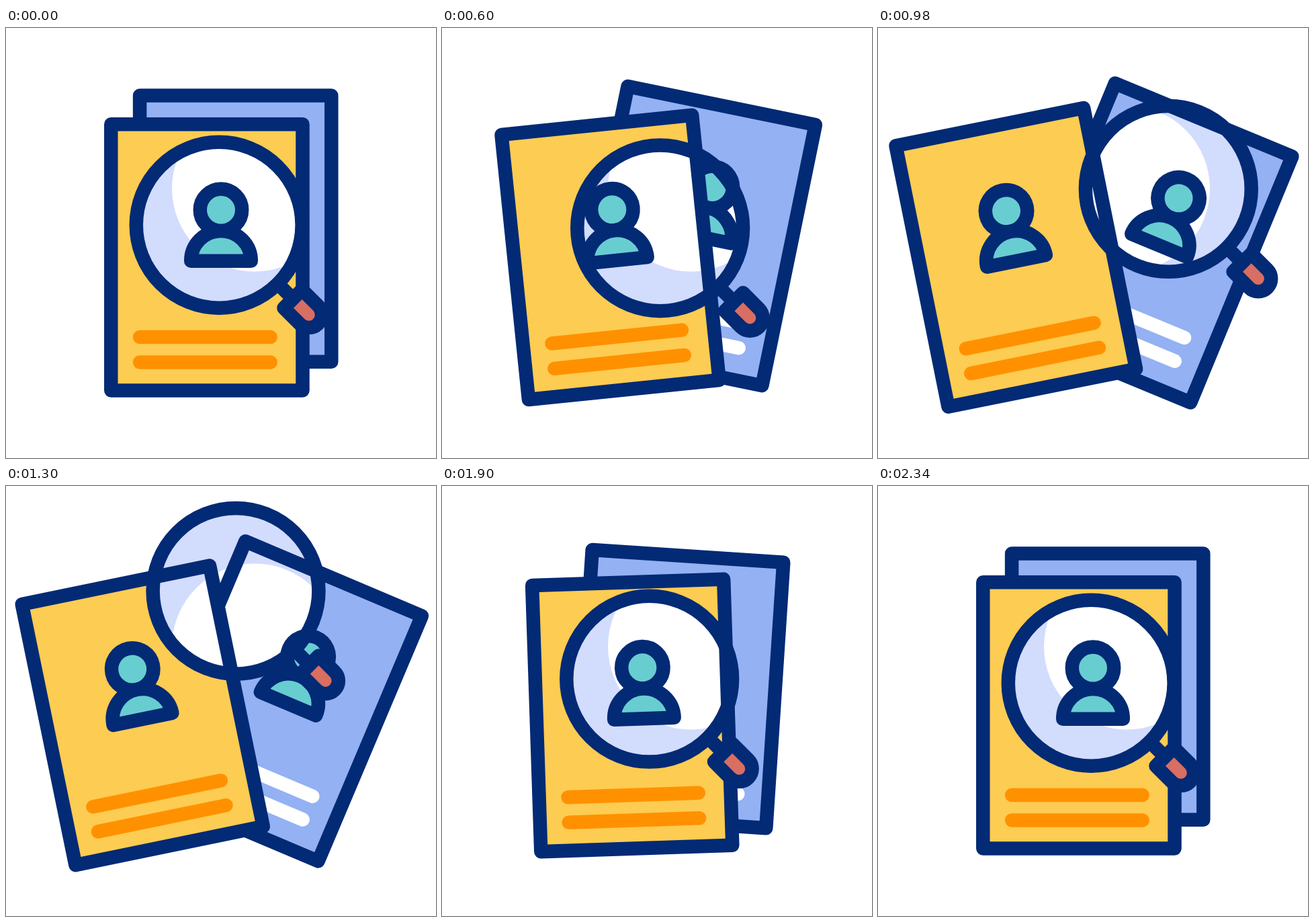
Animation of 640x640 px, one loop 2400 ms. Source, as an HTML page with a canvas:

```html
<!DOCTYPE html>
<html lang="en">
<head>
<meta charset="utf-8">
<title>Profile search</title>
<style>
  html, body { margin: 0; width: 100%; height: 100%; overflow: hidden; background: #fff; }
  canvas { display: block; width: 640px; height: 640px; }
</style>
</head>
<body>
<canvas id="stage" width="640" height="640"></canvas>
<script>
const ctx = document.getElementById('stage').getContext('2d');
const LOOP = 2400;
const NAVY = '#032a75', YELLOW = '#fdcc52', ORANGE = '#ff9100', BLUE = '#93b1f3';
const LILAC = '#d2dcfd', TEAL = '#68cdd1', RED = '#d96e62', WHITE = '#fff';
const STROKE = 20.5, CARD_W = 285.2, CARD_H = 396.3, LENS_R = 123.4;
const RAD = Math.PI / 180;

// Time (ms), angle on the lens orbit (deg), angular speed (deg/ms)
const ORBIT = [
  [350, 82.6, 0], [600, 77.5, -0.07], [980, -44.4, -0.29], [1300, -122.4, -0.265],
  [1600, -213.6, -0.28], [1900, -271.2, -0.07], [2150, -277.4, 0]
];

// Symmetric cubic-bezier(.76, 0, .24, 1)
function ease(x) {
  if (x <= 0) return 0;
  if (x >= 1) return 1;
  let lo = 0, hi = 1, s = 0.5;
  for (let i = 0; i < 24; i++) {
    s = (lo + hi) / 2;
    const bx = 3 * (1 - s) * (1 - s) * s * 0.76 + 3 * (1 - s) * s * s * 0.24 + s * s * s;
    if (bx < x) lo = s; else hi = s;
  }
  return s * s * (3 - 2 * s);
}

function spread(t) {
  return ease(t / 1200) - ease((t - 1220) / 1090);
}

function orbitAngle(t) {
  if (t <= ORBIT[0][0]) return ORBIT[0][1];
  for (let i = 1; i < ORBIT.length; i++) {
    const [t0, a0, v0] = ORBIT[i - 1], [t1, a1, v1] = ORBIT[i];
    if (t > t1) continue;
    const d = t1 - t0, u = (t - t0) / d, u2 = u * u, u3 = u2 * u;
    return a0 * (2 * u3 - 3 * u2 + 1) + a1 * (3 * u2 - 2 * u3)
      + d * (v0 * (u3 - 2 * u2 + u) + v1 * (u3 - u2));
  }
  return ORBIT[0][1] - 360;
}

// Tilted ellipse
function lensCentre(t) {
  const a = orbitAngle(t) * RAD, tilt = 38.3 * RAD;
  const u = 97.8 * Math.cos(a), v = 67 * Math.sin(a);
  return {
    x: 348.5 + u * Math.cos(tilt) - v * Math.sin(tilt),
    y: 233.3 + u * Math.sin(tilt) + v * Math.cos(tilt)
  };
}

function at(x, y, deg, draw) {
  ctx.save();
  ctx.translate(x, y);
  ctx.rotate(deg * RAD);
  draw();
  ctx.restore();
}

function paint(fill, stroke) {
  if (fill) { ctx.fillStyle = fill; ctx.fill(); }
  if (stroke) { ctx.strokeStyle = stroke; ctx.stroke(); }
}

function circle(x, y, r, fill, stroke) {
  ctx.beginPath();
  ctx.arc(x, y, r, 0, 2 * Math.PI);
  paint(fill, stroke);
}

function line(x0, x1, y, color) {
  ctx.beginPath();
  ctx.moveTo(x0, y);
  ctx.lineTo(x1, y);
  paint(null, color);
}

function cardRect(fill, stroke) {
  ctx.beginPath();
  ctx.rect(-CARD_W / 2, -CARD_H / 2, CARD_W, CARD_H);
  paint(fill, stroke);
}

function person(x, y) {
  circle(x, y - 76, 31.2, TEAL, NAVY);
  ctx.beginPath();
  ctx.arc(x, y, 44.8, Math.PI, 2 * Math.PI);
  ctx.closePath();
  paint(TEAL, NAVY);
}

function cardDetails(personX, personY, lineY, lineColor, lineEnd) {
  cardRect(null, NAVY);
  line(-99.8, lineEnd, lineY, lineColor);
  line(-99.8, lineEnd, lineY + 37.6, lineColor);
  person(personX, personY);
}

function glass(lens) {
  ctx.save();
  circle(lens.x, lens.y, LENS_R, LILAC);
  ctx.clip();
  circle(370.5, 239, 123.5, WHITE);
  ctx.restore();
}

function magnifier(lens) {
  circle(lens.x, lens.y, LENS_R, null, NAVY);
  at(lens.x, lens.y, 45, () => {
    line(LENS_R, 150, 0, NAVY);
    ctx.beginPath();
    ctx.moveTo(155.3, -19.2);
    ctx.lineTo(189, -19.2);
    ctx.arc(189, 0, 19.2, -Math.PI / 2, Math.PI / 2);
    ctx.lineTo(155.3, 19.2);
    ctx.closePath();
    paint(RED, NAVY);
  });
}

function draw(t) {
  const p = spread(t), lens = lensCentre(t);
  const back = [341.7 + 69 * p, 298.6 + 21.8 * p, 23 * p];
  const front = [298.9 - 96 * p, 341.4, -11.65 * p];

  ctx.fillStyle = WHITE;
  ctx.fillRect(0, 0, 640, 640);
  ctx.lineWidth = STROKE;
  ctx.lineCap = ctx.lineJoin = 'round';

  at(...back, () => cardRect(BLUE));
  at(...front, () => cardRect(YELLOW));
  glass(lens);

  // The back card's outlines stay hidden behind the front card
  ctx.save();
  at(...front, () => {
    cardRect();
    ctx.rect(-1500, -1500, 3000, 3000);
  });
  ctx.clip('evenodd');
  at(...back, () => cardDetails(10.3, -0.2, 112.5, WHITE, 97.4));
  ctx.restore();

  at(...front, () => cardDetails(21.1 - 22 * p, 5.4, 118.5, ORANGE, 94.8));
  magnifier(lens);
}

function tick() {
  draw(performance.now() % LOOP);
  requestAnimationFrame(tick);
}
tick();
</script>
</body>
</html>
```
